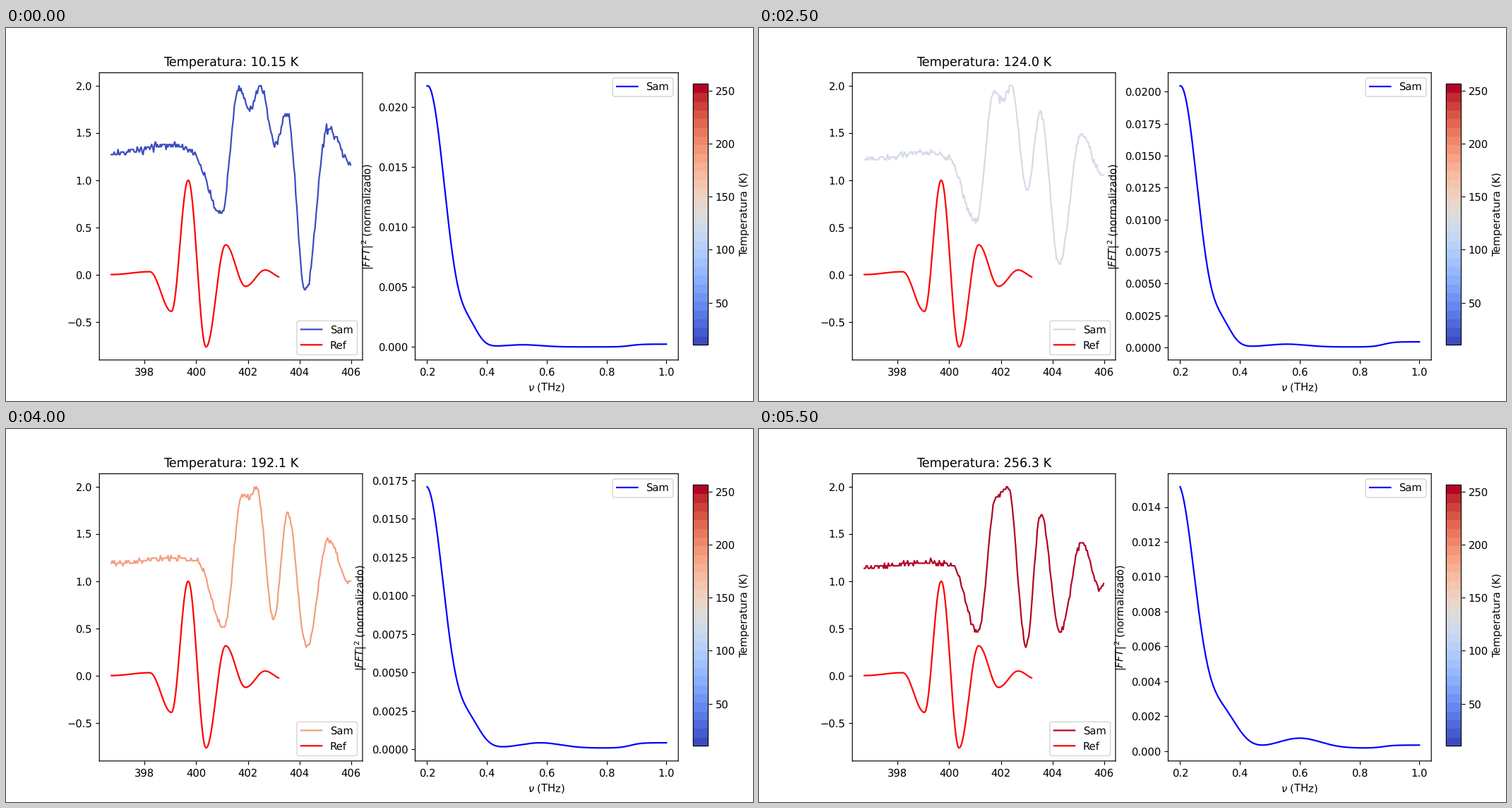
These frames come from a looping animation (1058x529 px, 6000 ms). A matplotlib script:

```python
import numpy as np
import matplotlib.pyplot as plt
from matplotlib.animation import FuncAnimation
from matplotlib.cm import ScalarMappable
from matplotlib.colors import Normalize

plt.rcParams.update({"path.snap": False, "text.hinting": "none"})

TEMPS = [10.15, 15.2, 24.7, 61.4, 98.3, 124.0,
         147.2, 170.5, 192.1, 213.6, 234.9, 256.3]
norm = Normalize(TEMPS[0], TEMPS[-1])
coolwarm = plt.get_cmap("coolwarm")

# turning points (ps, amplitude) of the pulses
REF = np.array([(396.71, 0), (398.2, .03), (399.04, -.39), (399.69, 1),
                (400.38, -.767), (401.14, .315), (401.91, -.125),
                (402.67, .048), (403.3, -.03)])
COLD = np.array([(396.71, 1.29), (399.34, 1.38), (399.8, 1.3), (400.98, .65),
                 (401.66, 1.97), (402.1, 1.75), (402.48, 2), (403.06, 1.38),
                 (403.52, 1.72), (404.23, -.18), (405.09, 1.55), (406, 1.18)])
HOT = np.array([(396.71, 1.15), (399.34, 1.2), (400.08, 1.18), (401.11, .46),
                (401.83, 1.9), (402.02, 1.94), (402.28, 2), (402.98, .32),
                (403.55, 1.72), (404.29, .47), (405.14, 1.41), (405.85, .92)])


def glide(points, x):
    """Pass through the turning points with cosine easing."""
    px, py = points.T
    i = np.clip(np.searchsorted(px, x) - 1, 0, len(px) - 2)
    s = (x - px[i]) / (px[i + 1] - px[i])
    return py[i] + (py[i + 1] - py[i]) * (1 - np.cos(np.pi * s)) / 2


def bell(x, center, width):
    return np.exp(-((x - center) / width) ** 2 / 2)


def sample(i, t):
    u = float(norm(TEMPS[i]))
    noise = np.random.default_rng(40 + i).normal(0, 0.02 - 0.008 * u, t.size)
    y = glide(COLD + (HOT - COLD) * u, t) + noise
    step = 0.027  # digitizer resolution
    return np.minimum(2 - np.round((2 - y) / step) * step, 2)


def spectrum(i, f):
    u = float(norm(TEMPS[i]))
    h = u ** 3
    peak = np.interp(TEMPS[i], [25, 98, 124, 170, 214, 256],
                     [217.6, 208.4, 204.3, 168.5, 171.1, 149.5])
    center, width = 0.202 - 0.012 * h, 0.0567 + 0.0033 * h
    main = bell(f, center, width) / bell(0.2, center, width)
    shoulder = (0.063 + 0.065 * h) * bell(f, 0.342, 0.03 + 0.02 * h)
    hump = (1.8 + 3.9 * h) * bell(f, 0.52 + 0.08 * u, 0.06 + 0.01 * u)
    rise = (2.3 + 8 * u * (1 - u) - 0.6 * u) / (1 + np.exp((0.88 - f) / 0.018))
    return (peak * (main + shoulder) + hump + rise + 1.7 * u ** 2) * 1e-4


time = np.linspace(396.71, 405.98, 250)
ref_time = np.linspace(396.71, 403.19, 300)
freq = np.linspace(0.2, 1.0, 400)

fig, (ax, fx) = plt.subplots(1, 2, figsize=(10, 5), dpi=105.8)

sam, = ax.plot(time, sample(0, time), label="Sam")
ax.plot(ref_time, glide(REF, ref_time), "r", label="Ref")
ax.set_ylim(-0.905, 2.138)
legend = ax.legend(loc="lower right")

fft, = fx.plot(freq, spectrum(0, freq), "b", label="Sam")
fx.set_xlabel(r"$\nu$ (THz)")
fx.set_ylabel(r"$|FFT|^2$ (normalizado)", labelpad=3)
fx.legend(loc="upper right")

cax = fig.add_axes([0.92, 0.15, 0.02, 0.7])
fig.colorbar(ScalarMappable(norm, plt.get_cmap("coolwarm", 30)), cax=cax,
             label="Temperatura (K)")


def update(i):
    color = coolwarm(norm(TEMPS[i]))
    sam.set_ydata(sample(i, time))
    sam.set_color(color)
    legend.get_lines()[0].set_color(color)
    ax.set_title(f"Temperatura: {TEMPS[i]} K")
    fft.set_ydata(spectrum(i, freq))
    fx.relim()
    fx.autoscale_view()
    return sam, fft


anim = FuncAnimation(fig, update, frames=len(TEMPS), interval=500, repeat=True)
plt.show()
```
